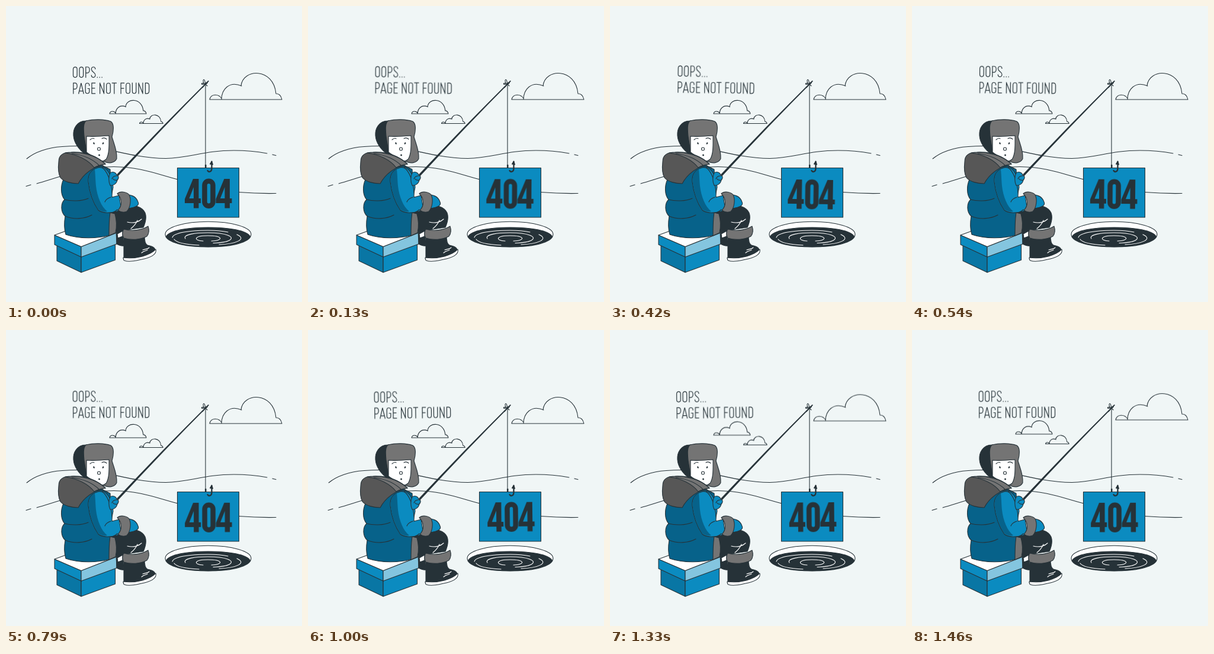
An HTML page that plays this animation: 500x500 px, repeating every 1500 ms.

```html
<!DOCTYPE html>
<html lang="en">
<head>
<meta charset="utf-8">
<title>Page not found</title>
<style>
  html, body { margin: 0; height: 100%; overflow: hidden; background: #f0f6f6; }
  svg { display: block; width: 100%; height: 100%; }
  :root { --ink: #263238; --blue: #0b8bc0; --navy: #07628a; --shade: #0976a4; --sky: #84c5df; --fur: #747474; --hood: #575757; }
  .ink { fill: var(--ink); }
  .blue { fill: var(--blue); }
  .navy { fill: var(--navy); }
  .shade { fill: var(--shade); }
  .sky { fill: var(--sky); }
  .fur { fill: var(--fur); }
  .hood { fill: var(--hood); }
  .white { fill: #fff; }
  .line { fill: none; }
  .wave { fill: none; stroke: #fff; }
  .sway { transform-origin: 247px 221px; animation: sway 1.5s linear infinite; }
  .lift { animation: lift 1.5s linear infinite; }
  @keyframes sway {
    0%, 100% { transform: rotate(0deg); }
    25% { transform: rotate(1deg); }
    75% { transform: rotate(-1deg); }
  }
  @keyframes lift {
    0%, 66.667% { transform: translateY(0); }
    100% { transform: translateY(-6.667px); }
  }
</style>
</head>
<body>
<svg viewBox="0 0 500 500" role="img" aria-label="OOPS... PAGE NOT FOUND 404"
     stroke="#263238" stroke-width="1.1" stroke-linecap="round" stroke-linejoin="round">
  <defs>
    <path id="cloud" class="line" vector-effect="non-scaling-stroke"
      d="M0 0C2-10 15-10 20-2M20 0C20-17 33-32 54-23M53-23C56-53 108-54 112-10C118-10 121-5 122 0H0"/>
    <path id="four" d="M316 292H325.500V325H329V333H325.500V341.500H317V333H302V326ZM317 325V306L309.500 325Z"/>
  </defs>

  <g id="hills" class="line">
    <path d="M35 258C48 247 70 239 95 237.500C115 236 140 236 160 240C200 249 235 257.500 270 257.500C310 257 335 244 385 244C405 244 425 246 441 249M450 251L456 252.500"/>
    <path d="M34 304.500L42 302M52 300C90 289 135 272 182 271.500C228 272 255 284 290 293C330 306 350 312 393 314.500C412 316 432 317 456 316.500"/>
  </g>

  <g class="lift">
    <use href="#cloud" transform="translate(344 158)"/>
    <use href="#cloud" transform="translate(175 182) scale(.508)"/>
    <use href="#cloud" transform="translate(225.500 198.500) scale(.325)"/>
  </g>

  <g id="hole">
    <ellipse class="white" cx="341.500" cy="385.500" rx="72.500" ry="21.300"/>
    <path class="ink" d="M270 390C276 379 306 374 341.500 374C377 374 407 379 413 390C406 401 377 407 341.500 407C306 407 277 401 270 390Z"/>
    <g class="wave">
      <path d="M281 391C283 383 310 379 341 379C354 379 366 380 375 382M390 386C408 394 388 402 360 403M284 394C288 400 305 403 326 404"/>
      <path d="M303 393C298 386 320 383 341 383C372 383 388 390 377 396C372 399 361 400 350 400.500"/>
      <path d="M333 397C316 396 317 388 341 388C367 388 368 396 347 397"/>
    </g>
  </g>

  <g id="sign">
    <path d="M337 130V274"/>
    <rect class="blue" x="289.500" y="273.500" width="104" height="83.500"/>
    <rect class="ink" x="336.500" y="268.500" width="1.500" height="5"/>
    <path class="line" stroke-width="2.300" d="M347.500 263V274C347.500 281 342 281 340.500 278"/>
    <path class="ink" d="M347.500 262L349.500 268L344.500 267Z"/>
  </g>

  <g id="seat">
    <path class="shade" d="M86 403L127 422V450L86 430.500Z"/>
    <path class="blue" d="M127 423L184.500 401V429L127 450Z"/>
    <path class="blue" d="M82 387L127 406.500V424L82 403Z"/>
    <path class="sky" d="M127 406.500L187 383V402L127 424Z"/>
    <path class="white" d="M82 387L104 379L150 372L187 383L127 406.500Z"/>
  </g>

  <g id="legs">
    <path class="ink" d="M186 380L197 377L199 405C195 406 191 404 187 402Z"/>
    <path class="white" d="M188 385L197 380V389L189 392Z"/>
    <path class="ink" d="M178 348C188 335 217 333 230 343C239 350 237 363 232 374L198 379L182 380Z"/>
    <path class="wave" d="M205 365C216 368 225 364 229 360M211 376C216 372 220 367 222 362"/>
    <path class="ink" d="M199 391L234 389C234 396 235 402 239 404C246 406 252 407 252 413C246 424 219 426 199 426Z"/>
    <path class="white" d="M198 425C220 428 244 421 253 411C255 419 246 424 234 427C221 430 208 433 200 430C198 429 198 427 198 425Z"/>
    <path class="wave" d="M231 412C236 410 239 411 242 408M229 417C233 413 236 414 239 412"/>
    <path class="fur" d="M199 377C212 381 229 379 240 372C242 378 242 384 238 389C227 395 211 396 199 392C196 388 196 381 199 377Z"/>
  </g>

  <g id="coat">
    <path class="blue" d="M200 319C210 318 220 321 223 331C226 337 219 340 207 342Z"/>
    <path class="navy" d="M97 293C92 304 92 319 99 327C92 333 92 348 100 355C98 366 98 376 101 386C124 394 155 393 176 387L179 350L176 276L160 268L110 280Z"/>
    <path class="line" d="M99 327C110 330 128 330 139 325M100 355C114 361 132 360 145 353"/>
    <path class="fur" d="M176 349L184 351C187 362 187 374 185 383L174 388C174 374 174 361 176 349Z"/>
    <path class="blue" d="M163 272C173 276 179 289 181 306L177 326L166 320Z"/>
    <path id="sleeve" class="blue" d="M153 274C143 277 138 286 139 297C141 314 147 332 156 345C166 352 181 349 195 345L191 320L179 323C180 306 174 284 165 275C161 272 157 272 153 274Z"/>
    <path class="navy" stroke="none" d="M150 276C142 279 139 287 139.600 297C141.500 314 147.500 331 156 344C161 347 166 348 171 347C161 339 154 322 152 304C151 293 151 285 150 276Z"/>
    <path class="line" d="M177 323C171 325 168 328 167 331M180 349C184 347 186 346 188 344"/>
    <path class="fur" d="M188 317C193 312 204 314 208 319C212 327 210 341 204 347C199 349 193 348 189 345C197 337 196 325 188 317Z"/>
  </g>

  <g id="rod">
    <path class="ink" stroke-width=".5" d="M187 285Q264 203 341.700 126L342.700 127Q266 204 189.500 287Z"/>
    <path class="line" d="M337 132C329 128 328 134 335 132C330 124 336 120 336.500 131C341 126 342 131 337 132L332 138M337 132L340 135"/>
    <path class="blue" d="M176 282C180 279 186 281 187 286C191 287 191 291 188 294C187 300 181 304 176 303C173 297 173 288 176 282Z"/>
    <path class="line" d="M187 287C183 287 180 289 179 292M188 294C184 295 182 294 181 292"/>
  </g>

  <g id="head">
    <path class="ink" d="M135 194C120 194 113 207 114 219C115 231 122 242 136 252L144 240L148 193Z"/>
    <path class="fur" d="M135 194C148 191 166 191 177 195C183 199 182 211 179 221C182 232 188 244 187 258C183 266 173 266 166 263L136 246L132 220C131 209 130 199 135 194Z"/>
    <path class="white" d="M136 220C149 221 162 220 174 219C174 234 175 250 169 259C163 265 153 262 146 254L136 247Z"/>
    <path class="line" d="M142 226C144 224 147 223 149 224M162 224C165 222 168 223 170 225"/>
    <ellipse class="ink" cx="148.500" cy="232" rx="1.200" ry="1.700" stroke="none" transform="rotate(-30 148.500 232)"/>
    <ellipse class="ink" cx="164" cy="232" rx="1.200" ry="1.700" stroke="none" transform="rotate(30 164 232)"/>
    <circle class="line" cx="157" cy="241.500" r="2.500"/>
    <circle class="ink" cx="157.500" cy="252" r="1.400" stroke="none"/>
    <path class="hood" d="M89 263C89 252 96 247 110 247C132 246 151 251 168 267C148 271 131 283 122 300C111 300 98 297 92 290C88 283 88 272 89 263Z"/>
    <path class="fur" d="M100 248C126 245 151 251 168 267C161 268 154 270 149 273C139 260 121 251 100 248Z"/>
    <path class="line" d="M111 249C132 252 148 260 157 269M149 273C160 269 168 271 172 275"/>
  </g>

  <g class="sway">
    <g id="words" class="line" stroke-width="1.200" stroke-linecap="butt" stroke-linejoin="miter"></g>
    <g class="ink" stroke="none" fill-rule="evenodd">
      <use href="#four"/>
      <use href="#four" x="52.500"/>
    </g>
    <rect class="line" x="335.500" y="295.700" width="14" height="42" rx="7" stroke-width="8.500"/>
  </g>
</svg>
<script>
  // Condensed stroke lettering: [advance, path], cap height 19.
  const glyphs = {
    O: [10.4, "M1.9 4.5C1.9-.5 8.5-.5 8.5 4.5V14.5C8.5 19.5 1.9 19.5 1.9 14.5Z"],
    P: [10, "M2.2 19V.7H5C9.7 .7 9.7 10.8 5 10.8H2.2"],
    S: [10, "M8.2 4.7C8.2-.6 1.7-.6 1.7 4.5C1.7 9.5 8.3 9.5 8.3 14.5C8.3 19.6 1.6 19.6 1.6 14.3"],
    A: [10.5, "M.9 19L5.2 .7L9.6 19M2.1 14.2H8.4"],
    G: [10.4, "M8.5 5.5V4.5C8.5-.5 1.9-.5 1.9 4.5V14.5C1.9 19.5 8.5 19.5 8.5 14.5V10H5.3"],
    E: [9.2, "M8.4 .7H2.2V18.3H8.4M2.2 9.4H7.6"],
    N: [11.3, "M2.2 19V0M2.2 1L9.1 18M9.1 19V0"],
    T: [9.2, "M.5 .7H8.7M4.6 .7V19"],
    F: [8.9, "M8.2 .7H2.2V19M2.2 9.6H7.5"],
    U: [10.4, "M2 0V14.5C2 19.5 8.4 19.5 8.4 14.5V0"],
    D: [10.5, "M2.2 .7H4.6C7 .7 8.4 2 8.4 4.8V14.2C8.4 17 7 18.3 4.6 18.3H2.2Z"],
    ".": [3.8, "M1.6 17.4V19"],
    " ": [4.3, ""]
  };
  const spacing = 0.08;

  function write(text, x, y) {
    const words = document.getElementById("words");
    for (const char of text) {
      const [advance, d] = glyphs[char];
      const path = document.createElementNS("http://www.w3.org/2000/svg", "path");
      path.setAttribute("d", d);
      path.setAttribute("transform", `translate(${x} ${y})`);
      words.append(path);
      x += advance + spacing;
    }
  }

  write("OOPS...", 111.6, 102.3);
  write("PAGE NOT FOUND", 111.6, 129.5);
</script>
</body>
</html>
```
